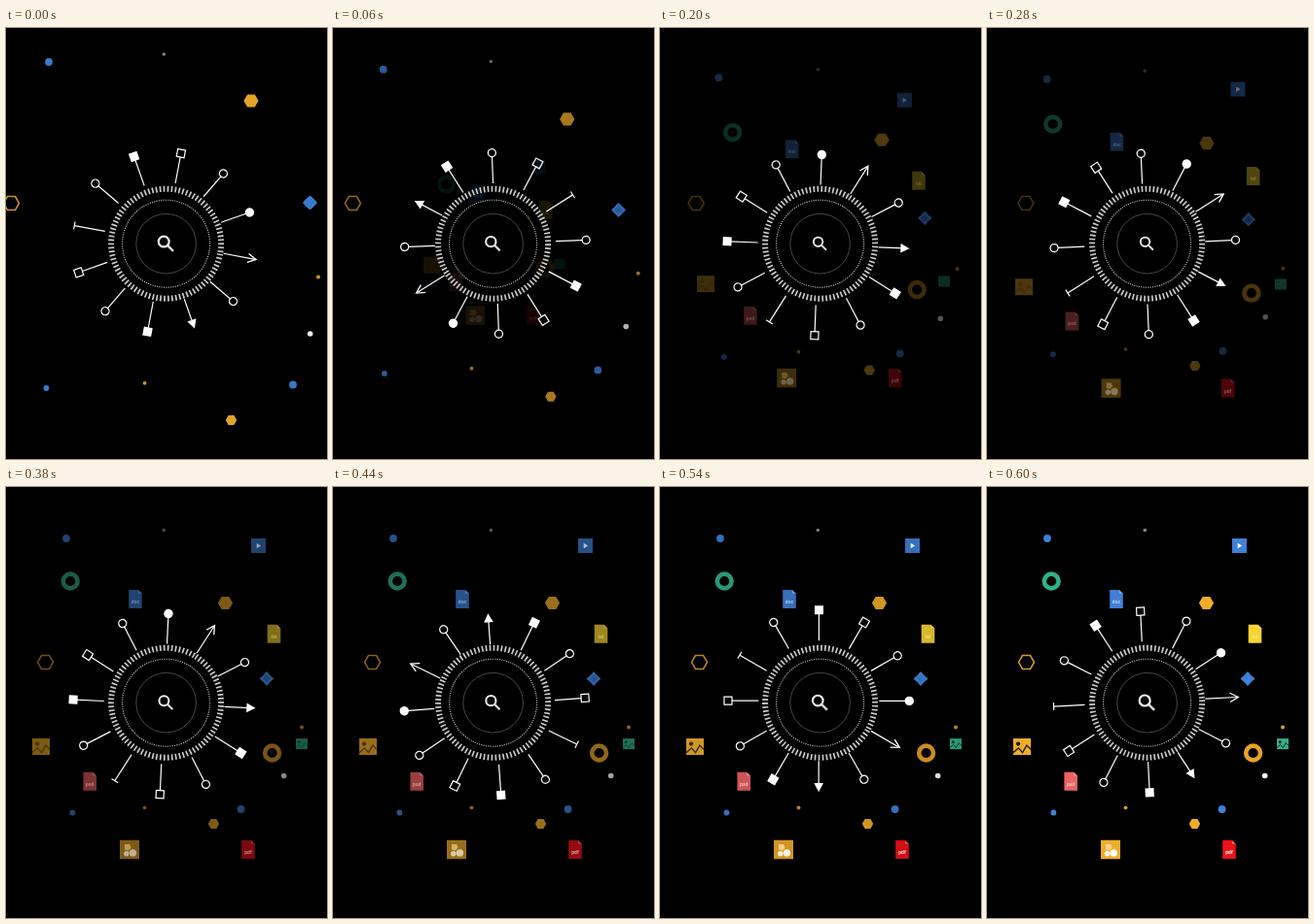
An HTML page with a canvas for the animation above (620 ms loop, 330 by 444 pixels).

```html
<!DOCTYPE html>
<html lang="en">
<head>
<meta charset="utf-8">
<title>Search dial</title>
<style>
  html, body { margin: 0; width: 100%; height: 100%; overflow: hidden; background: #000; }
  canvas { display: block; width: 330px; height: 444px; }
</style>
</head>
<body>
<canvas id="stage"></canvas>
<script>
const W = 330, H = 444, LOOP = 620, STEP = 20, TAU = Math.PI * 2;
const CX = 164.6, CY = 222.2;
const BLUE = '#4080d6', AMBER = '#f0ad2a', WHITE = '#fff', GREEN = '#2fb18c';
const canvas = document.getElementById('stage');
const ctx = canvas.getContext('2d');
const dpr = window.devicePixelRatio || 1;
canvas.width = W * dpr;
canvas.height = H * dpr;

const clamp = v => Math.min(1, Math.max(0, v));
const smooth = v => v * v * (3 - 2 * v);

// Piecewise linear lookup in [time, value] pairs.
function track(keys, t) {
  let i = 1;
  while (i < keys.length - 1 && keys[i][0] < t) i++;
  const [t0, a] = keys[i - 1], [t1, b] = keys[i];
  return a + (b - a) * clamp((t - t0) / (t1 - t0));
}
const lateFade = [[280, .32], [440, .64], [600, 1]];
const dotFade = [[0, .94], [120, .46], [200, .33], ...lateFade];
const fileFade = [[0, 0], [120, .2], [200, .26], ...lateFade];

// ---- basic shapes
function poly(points, close = true) {
  ctx.beginPath();
  points.forEach(([x, y]) => ctx.lineTo(x, y));
  if (close) ctx.closePath();
}
function paint(color, line) {
  if (line) {
    ctx.strokeStyle = color;
    ctx.lineWidth = line;
    ctx.stroke();
  } else {
    ctx.fillStyle = color;
    ctx.fill();
  }
}
function disc(x, y, r, color, line) {
  ctx.beginPath();
  ctx.arc(x, y, r, 0, TAU);
  paint(color, line);
}
function box(x, y, w, h, color, line) {
  ctx.beginPath();
  ctx.rect(x - w / 2, y - h / 2, w, h);
  paint(color, line);
}
function hex(r, color, line) {
  poly(Array.from({ length: 6 }, (_, i) =>
    [r * Math.cos(i * TAU / 6), r * Math.sin(i * TAU / 6)]));
  paint(color, line);
}

// ---- drifting marks
const dot = (r, color) => () => disc(0, 0, r, color);
const hexagon = (r, color, line) => () => hex(r, color, line);

function star(rest) {
  const c = 2.6 + rest;
  ctx.beginPath();
  ctx.moveTo(0, -6.3);
  ctx.quadraticCurveTo(c, -c, 6.3, 0);
  ctx.quadraticCurveTo(c, c, 0, 6.3);
  ctx.quadraticCurveTo(-c, c, -6.3, 0);
  ctx.quadraticCurveTo(-c, -c, 0, -6.3);
  ctx.closePath();
  paint(BLUE);
  ctx.lineJoin = 'round';
  paint(BLUE, 2);
}

// [x, y, start offset x, start offset y, draw]
const marks = [
  [62, 53, -18, -18, dot(3.9, BLUE)],
  [162.3, 44.5, 0, -17.5, dot(1.8, '#8a8a8a')],
  [225.5, 119.5, 26.5, -44.5, hexagon(7.6, AMBER)],
  [40.5, 180.5, -35, 0, hexagon(8, '#dc9a22', 1.5)],
  [268, 197.5, 44.5, -17.5, star],
  [304, 247.5, 17, 9, dot(2, '#dca024')],
  [285.7, 297.5, 27, 17.5, dot(2.8, WHITE)],
  [241.6, 332, 53.4, 35.5, dot(3.9, BLUE)],
  [213.5, 347, 18, 57, hexagon(5.7, AMBER)],
  [142.5, 330.3, 0, 35.5, dot(1.9, '#dca024')],
  [68.4, 335.5, -27, 35.5, dot(2.9, BLUE)]
];

// ---- file icons
const ring = color => () => disc(0, 0, 7.4, color, 4.6);

const page = (color, label, ink) => () => {
  poly([[-6.8, -9.5], [3, -9.5], [6.8, -5.7], [6.8, 9.5], [-6.8, 9.5]]);
  paint(color);
  poly([[3, -9.5], [6.8, -5.7], [3, -5.7]]);
  paint('rgba(255,255,255,.35)');
  ctx.fillStyle = ink;
  ctx.font = 'bold 5px Roboto, Arial, sans-serif';
  ctx.textAlign = 'center';
  ctx.fillText(label, 0, 4.5);
};

const picture = (w, h, color) => () => {
  box(0, 0, w, h, color);
  disc(-w * .22, -h * .17, w * .12, '#1c1608');
  poly([[-w / 2, h * .36], [-w * .2, h * .08], [w * .03, h * .36],
        [w * .27, -h * .08], [w / 2, h * .16]], false);
  paint('#1c1608', w * .075);
};

function video() {
  box(0, 0, 15, 15, BLUE);
  poly([[-1.8, -2.7], [2.6, 0], [-1.8, 2.7]]);
  paint(WHITE);
}

function shapes() {
  box(0, 0, 20, 19.5, AMBER);
  poly([[-5, -5.5], [0, -5.5], [1.5, -2], [-1, 1], [-5, 0]]);
  paint('#f8d794');
  disc(-3.2, 4.2, 2.7, WHITE);
  disc(3.4, 3.4, 3.7, WHITE);
}

const files = [
  [66.2, 97, ring(GREEN)],
  [133, 115.5, page(BLUE, 'doc', '#b9d4f6')],
  [259.5, 60.5, video],
  [275.5, 151.3, page('#f8d433', 'txt', '#fbe88f')],
  [273.6, 274, ring('#e8a227')],
  [304, 264.6, picture(12, 11, GREEN)],
  [249, 373.5, page('#ec1218', 'pdf', '#fff')],
  [127, 373.5, shapes],
  [86.2, 303.2, page('#ee6262', 'psd', '#fbd0d0')],
  [36, 267.5, picture(18, 17, AMBER)]
];

// ---- dial: each tip is drawn pointing up, the stem ends at `end`
const tips = {
  openSquare: { end: 89.3, draw() { box(0, -93.3, 8, 8, WHITE, 1.2); } },
  openCircle: { end: 89.3, draw() { disc(0, -93.3, 4, WHITE, 1.3); } },
  square: { end: 92, draw() { box(0, -93.6, 9, 9, WHITE); } },
  circle: { end: 92, draw() { disc(0, -93, 4.7, WHITE); } },
  bar: { end: 94, draw() { poly([[-4, -94], [4, -94]], false); paint(WHITE, 1.2); } },
  arrow: {
    end: 95,
    draw() { poly([[-4.6, -87.5], [0, -96], [4.6, -87.5]], false); paint(WHITE, 1.3); }
  },
  wedge: {
    end: 88,
    draw() { poly([[-4.8, -84.8], [0, -94], [4.8, -84.8]]); paint(WHITE); }
  }
};
const spokes = ['openSquare', 'openCircle', 'circle', 'arrow', 'openCircle', 'wedge',
  'square', 'openCircle', 'openSquare', 'bar', 'openCircle', 'square'];

// The spoke wheel sits slightly off its pivot, so it wobbles as it turns.
function drawSpokes(angle) {
  ctx.save();
  ctx.translate(CX, CY);
  ctx.rotate(angle * TAU / 360);
  ctx.translate(-2.1, -1);
  ctx.lineJoin = 'miter';
  for (const name of spokes) {
    const tip = tips[name];
    poly([[0, -62], [0, -tip.end]], false);
    paint(WHITE, 1.2);
    tip.draw();
    ctx.rotate(TAU / spokes.length);
  }
  ctx.restore();
}

function drawDial(angle, zoom) {
  ctx.save();
  ctx.translate(CX, CY);
  disc(0, 0, 30.8, '#474747', 1);
  ctx.save();
  ctx.rotate(angle * TAU / 360);
  ctx.setLineDash([TAU * 45 / 240, TAU * 45 / 240]);
  disc(0, 0, 45, '#bcbcbc', 1.1);
  ctx.setLineDash([1.7, TAU * 56.5 / 90 - 1.7]);
  disc(0, 0, 56.5, '#c8c8c8', 6);
  ctx.restore();

  ctx.scale(zoom, zoom);
  disc(-2.2, -2, 5, '#f2f2f2', 2);
  poly([[1.6, 1.8], [6.8, 7]], false);
  paint('#dcdcdc', 2.2);
  ctx.restore();
}

function place(x, y, draw, arg) {
  ctx.save();
  ctx.translate(x, y);
  draw(arg);
  ctx.restore();
}

function render(t) {
  const rest = Math.pow(clamp(1 - t / 410), 3.5);
  const back = smooth(clamp((t - 332) / 258));
  const angle = 333.3 - 322.7 * rest - 336.2 * back;
  const glow = track(dotFade, t);

  ctx.setTransform(dpr, 0, 0, dpr, 0, 0);
  ctx.globalAlpha = 1;
  ctx.fillStyle = '#000';
  ctx.fillRect(0, 0, W, H);

  const spread = 1 - .89 * rest;
  ctx.globalAlpha = track(fileFade, t);
  for (const [x, y, draw] of files) {
    place(CX + (x - CX) * spread, CY + (y - CY) * spread, draw);
  }
  ctx.globalAlpha = glow;
  for (const [x, y, dx, dy, draw] of marks) {
    place(x + dx * rest, y + dy * rest, draw, rest);
  }
  ctx.globalAlpha = 1;
  drawDial(angle, .86 + .24 * glow);
  drawSpokes(angle);
}

const start = performance.now();
function tick() {
  const t = (performance.now() - start) % LOOP;
  render(Math.floor(t / STEP) * STEP);
  requestAnimationFrame(tick);
}
tick();
</script>
</body>
</html>
```
